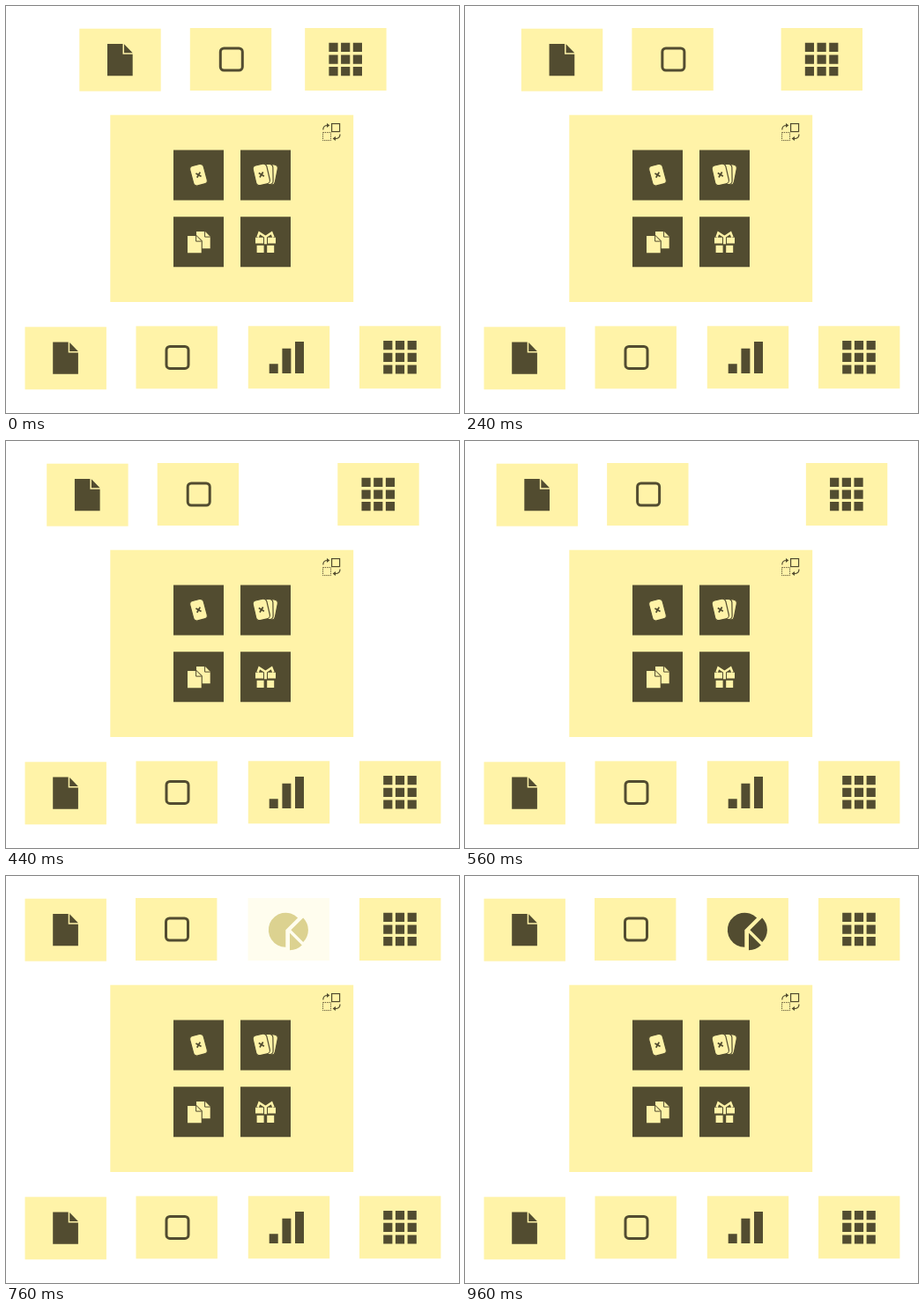
Recreate the animation shown at these times as an HTML page. Size 514x462 px, loop 1.16 s.

```html
<!DOCTYPE html>
<html lang="en">
<head>
<meta charset="utf-8">
<title>Tile row making room</title>
<style>
  html, body { margin: 0; width: 100%; height: 100%; overflow: hidden; background: #fff; }
  svg { display: block; }
  .dark { fill: #524c30; }
  .light, .tile { fill: #fff3a8; }
  .line { fill: none; stroke: #524c30; }
</style>
</head>
<body>
<svg width="514" height="462" viewBox="0 0 514 462">
  <defs>
    <rect id="tile" class="tile" width="92.4" height="71"/>
    <g id="doc">
      <use href="#tile" y=".7"/>
      <path class="dark" d="M31.7 17.9H49.2V29.8H60.4V54.2H31.7ZM50.7 18.3V28.3H60.4Z"/>
    </g>
    <g id="box">
      <use href="#tile"/>
      <rect class="line" x="34.5" y="23" width="25" height="25" rx="4" stroke-width="3"/>
    </g>
    <g id="grid">
      <use href="#tile"/>
      <path class="line" stroke-width="10.2" stroke-dasharray="10.2 3.5"
        d="M27.2 21.9h37.6M27.2 35.6h37.6M27.2 49.2h37.6"/>
    </g>
    <g id="card">
      <rect class="light" x="-8" y="-11.6" width="16" height="23.2" rx="4" stroke="#524c30" stroke-width="1.2"/>
    </g>
    <path id="cross" class="line" stroke-width="1.8" d="M-2.5 -2.5L2.5 2.5M-2.5 2.5L2.5 -2.5"/>
    <g id="page">
      <path class="light" d="M0 0H10L15.7 5.7V19.2H0Z"/>
      <path class="line" stroke-width="1" d="M9.6 0V6.1H15.7"/>
    </g>
  </defs>

  <!-- top row -->
  <g id="left">
    <use href="#doc" x="21.5" y="25"/>
    <use href="#box" x="147" y="25"/>
  </g>
  <g id="pie">
    <use href="#tile" id="pieTile" x="274.5" y="25"/>
    <path id="slices" d="M317.3 61.2L331.1 47.4A19.5 19.5 0 1 0 317.3 80.7Z
      M323.4 61.2L337.2 47.4A19.5 19.5 0 0 1 337.2 75Z
      M322 64.7V84.2A19.5 19.5 0 0 0 335.8 78.5Z"/>
  </g>
  <use id="right" href="#grid" x="401" y="25"/>

  <!-- panel -->
  <rect class="light" x="118.3" y="123.7" width="275.9" height="212.3"/>
  <path class="dark" d="M190 163.6h57v57h-57zM266 163.6h57v57h-57zM190 239.3h57v57h-57zM266 239.3h57v57h-57z"/>
  <g transform="translate(218.5 191.7) rotate(-15)">
    <use href="#card"/><use href="#cross"/>
  </g>
  <use href="#card" transform="translate(299 190.7) rotate(11)"/>
  <use href="#card" transform="translate(295 191) rotate(-1)"/>
  <g transform="translate(289.8 191.4) rotate(-13)">
    <use href="#card"/><use href="#cross"/>
  </g>
  <use href="#page" x="216" y="256"/>
  <path class="dark" d="M205 260H216L222.8 266.5V281H205Z"/>
  <use href="#page" x="206" y="261"/>
  <path fill="none" stroke="#fff3a8" stroke-width="2.6" d="M285.6 262.5L287.4 257.4L294.5 262L301.4 257.4L303.4 262.5"/>
  <path class="light" d="M283 262.8h9v6.6h-9zM297 262.8h9v6.6h-9zM293 262h3v8.2h-3zM284.6 271.8h8v8.2h-8zM296.2 271.8h8v8.2h-8z"/>

  <!-- swap symbol -->
  <g class="line" stroke-width="1.2">
    <rect x="369.6" y="133.6" width="9" height="9"/>
    <rect x="359.6" y="143.6" width="9" height="9" stroke-width="1" stroke-dasharray="1.2 1"/>
    <path d="M359.8 140.5Q359.8 135.5 365 135.5M379 145.5Q379 150.6 373.6 150.6"/>
  </g>
  <path class="dark" d="M364 133L367.4 135.5L364 138ZM374 148.1L370.6 150.6L374 153.1Z"/>

  <!-- bottom row -->
  <use href="#doc" x="21.5" y="363.6"/>
  <use href="#box" x="147.5" y="363.4"/>
  <use href="#tile" x="274.8" y="363.3"/>
  <path class="dark" d="M298.7 406.2h10v10.8h-10zM313.4 388.8h10v28.2h-10zM328 381h10v36h-10z"/>
  <use href="#grid" x="401" y="363.3"/>
</svg>
<script>
  const LOOP = 1160, STEP = 40, GAP = 61.8;
  const el = id => document.getElementById(id);
  const clamp = v => Math.max(0, Math.min(1, v));
  const light = [255, 243, 168], dark = [82, 76, 48];

  function draw(now) {
    const t = Math.min(960, Math.floor(now % LOOP / STEP) * STEP);
    const shift = GAP * (1 - clamp((t - 20) / 700));
    const fade = clamp((t - 710) / 250);
    el('left').setAttribute('transform', `translate(${shift} 0)`);
    el('right').setAttribute('transform', `translate(${-shift} 0)`);
    el('pie').setAttribute('visibility', t > 720 ? 'visible' : 'hidden');
    el('pieTile').setAttribute('opacity', fade);
    el('slices').setAttribute('fill', `rgb(${light.map((c, i) => c + (dark[i] - c) * fade)})`);
  }

  const start = performance.now();
  function loop() {
    draw(performance.now() - start);
    requestAnimationFrame(loop);
  }
  loop();
</script>
</body>
</html>
```
